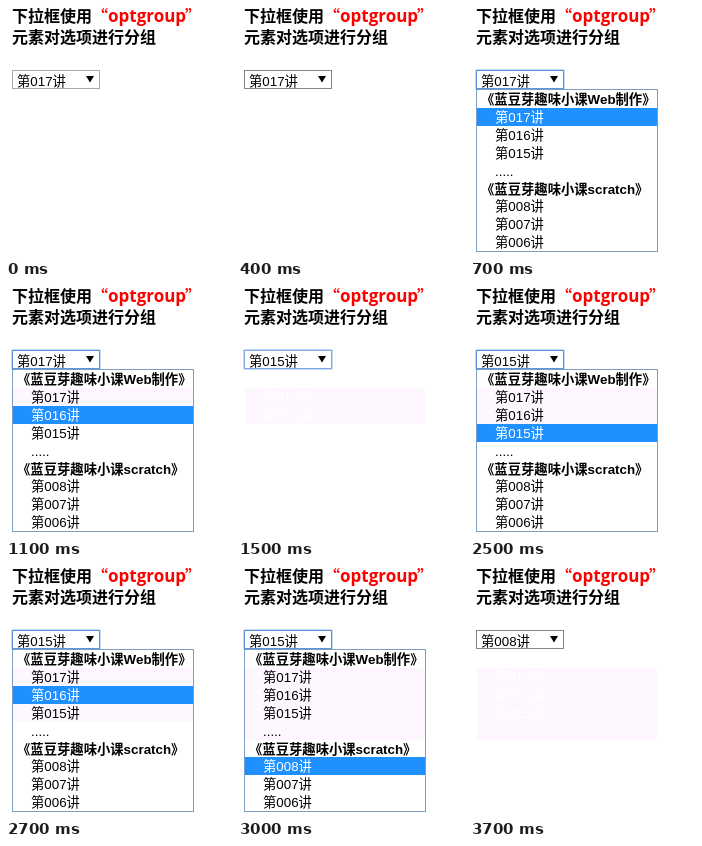
Recreate the animation shown at these times as an HTML page. Size 226x252 px, loop 3.8 s.

```html
<!DOCTYPE html>
<html lang="zh-CN">
<head>
<meta charset="utf-8">
<title>optgroup</title>
<style>
  html, body { margin: 0; width: 100%; height: 100%; overflow: hidden; background: #fff; }
  svg { display: block; width: 226px; height: 252px; }
  text { font: 13.333px "Liberation Sans", "Noto Sans CJK SC", "Noto Sans CJK", sans-serif; white-space: pre; }
  .head { font: 700 16px "Noto Sans CJK SC", "Noto Sans CJK", sans-serif; }
  .latin { font: 700 17px "Open Sans", sans-serif; }
  .group { font-weight: 700; }
</style>
</head>
<body>
<svg id="stage" viewBox="0 0 226 252">
  <text class="head" x="6" y="16">下拉框使用</text>
  <g fill="#f00">
    <text class="head" x="86" y="16">“</text>
    <text class="latin" x="102" y="16">optgroup</text>
    <text class="head" x="179" y="16">”</text>
  </g>
  <text class="head" x="6" y="37">元素对选项进行分组</text>
</svg>
<script>
(() => {
  const LOOP = 3800, FOCUS = 600, BLUR = 3700;
  const stage = document.getElementById('stage');

  function add(tag, attrs, content = '') {
    const el = document.createElementNS('http://www.w3.org/2000/svg', tag);
    for (const key in attrs) el.setAttribute(key, attrs[key]);
    el.textContent = content;
    stage.appendChild(el);
    return el;
  }
  const show = (el, on) => el.setAttribute('visibility', on ? 'visible' : 'hidden');

  // Closed select box
  const ring = add('rect', { x: 5.5, y: 63.5, width: 89, height: 20, rx: 1, fill: 'none', stroke: '#c3d9f5' });
  const box = add('rect', { x: 6.5, y: 64.5, width: 87, height: 18, fill: '#fff' });
  const value = add('text', { x: 11, y: 80 });
  add('path', { d: 'M80 70h8l-4 6.5z' });

  // Drop-down list
  const list = add('rect', { x: 6.5, y: 83.5, width: 181, height: 162, fill: '#fff', stroke: '#7b9fc4' });
  const lesson = n => `第${String(n).padStart(3, '0')}讲`;
  const labels = [
    '《蓝豆芽趣味小课Web制作》', ...[17, 16, 15].map(lesson), '.....',
    '《蓝豆芽趣味小课scratch》', ...[8, 7, 6].map(lesson)
  ];
  const rowTop = i => Math.round(84 + i * 17.9);
  const rows = labels.map((label, i) => {
    const y = rowTop(i), group = label[0] === '《';
    return {
      bar: add('rect', { x: 7, y, width: 180, height: rowTop(i + 1) - y }),
      text: add('text', { x: group ? 11 : 25, y: y + 14, class: group ? 'group' : '' }, label)
    };
  });

  // Each visit opens the list, moves over some rows and picks the last one
  const visits = [
    { enter: 400, close: 1500, moves: [{ at: 700, row: 1 }, { at: 1100, row: 2 }, { at: 1200, row: 3 }] },
    { enter: 2100, close: 3300, moves: [{ at: 2500, row: 3 }, { at: 2700, row: 2 }, { at: 2800, row: 4 }, { at: 3000, row: 6 }] }
  ];

  function stateAt(t) {
    const state = { open: false, active: 0, selected: 1, left: new Set(), hover: t >= BLUR, focus: t >= FOCUS && t < BLUR };
    for (const { enter, close, moves } of visits) {
      const passed = moves.filter(m => m.at <= t).map(m => m.row);
      passed.slice(0, -1).forEach(row => state.left.add(row));
      if (t >= close) state.selected = passed.at(-1);
      else if (t >= enter) {
        state.hover = true;
        state.open = passed.length > 0;
        state.active = passed.at(-1);
      }
    }
    return state;
  }

  function draw({ open, active, selected, left, hover, focus }) {
    show(ring, focus);
    box.setAttribute('stroke', focus ? (hover ? '#5f94d8' : '#7fa9e0') : (hover ? '#848484' : '#a9a9a9'));
    value.textContent = labels[selected];
    show(list, open);
    rows.forEach(({ bar, text }, i) => {
      const lit = open && i === active;
      const faded = left.has(i);
      show(bar, lit || faded);
      bar.setAttribute('fill', lit ? '#1e90ff' : '#fef7ff');
      show(text, open || faded);
      text.setAttribute('fill', lit || !open ? '#fff' : '#000');
    });
  }

  const start = performance.now();
  function tick() {
    draw(stateAt((performance.now() - start) % LOOP));
    requestAnimationFrame(tick);
  }
  tick();
})();
</script>
</body>
</html>
```
